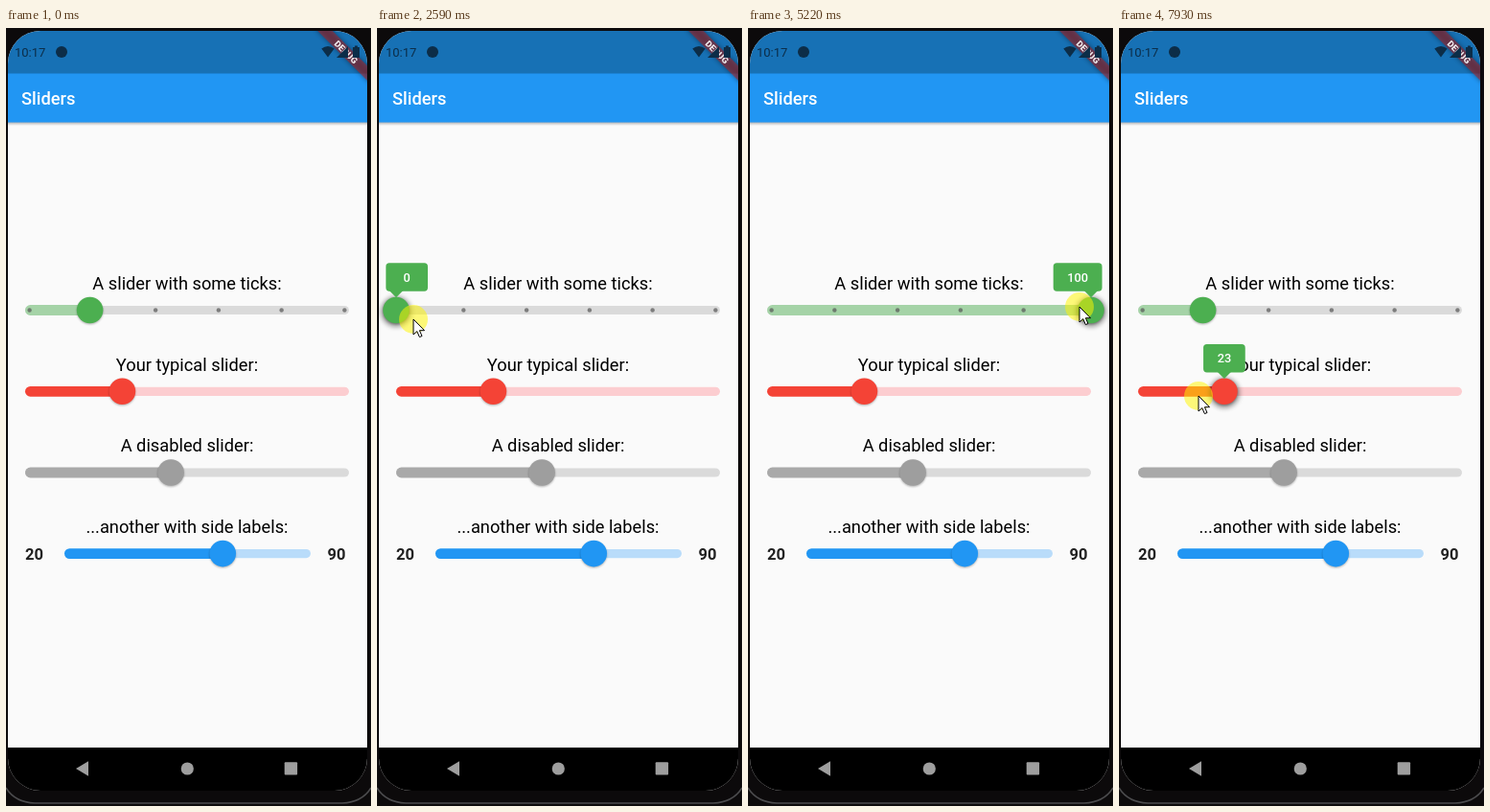
An HTML page for the animation above (8000 ms loop, 381 by 812 pixels).

```html
<!DOCTYPE html>
<html lang="en">
<head>
<meta charset="utf-8">
<title>Sliders</title>
<style>
  html, body { margin: 0; width: 100%; height: 100%; overflow: hidden; background: #0c0a0b; }
  svg { display: block; width: 381px; height: 812px; font-family: Roboto, sans-serif; }
  .caption { font-size: 18.28px; text-anchor: middle; fill: #000; }
  .side { font-size: 16.5px; font-weight: 700; text-anchor: middle; fill: #212121; }
  .tip { font-size: 12.8px; font-weight: 500; text-anchor: middle; fill: #fff; }
</style>
</head>
<body>
<svg viewBox="0 0 381 812">
  <defs>
    <clipPath id="screen"><rect x="2" y="3" width="375" height="793" rx="34"/></clipPath>
    <filter id="soft" x="-60%" y="-60%" width="220%" height="220%"><feGaussianBlur stdDeviation="1"/></filter>
    <filter id="wide" x="-60%" y="-60%" width="220%" height="220%"><feGaussianBlur stdDeviation="2.6"/></filter>
    <linearGradient id="shade" x2="0" y2="1">
      <stop stop-color="#000" stop-opacity=".3"/><stop offset="1" stop-color="#000" stop-opacity="0"/>
    </linearGradient>
  </defs>

  <rect width="381" height="812" fill="#0c0a0b"/>
  <path d="M0 793Q9 808 30 809H351Q372 808 381 793" fill="none" stroke="#4b4b4d" stroke-width="1.5"/>
  <g clip-path="url(#screen)">
    <rect x="2" y="3" width="375" height="793" fill="#fafafa"/>
    <rect x="2" y="98" width="375" height="4" fill="url(#shade)"/>
    <rect x="2" y="47" width="375" height="51.5" fill="#2196f3"/>
    <rect x="2" y="3" width="375" height="44.5" fill="#1771b5"/>
    <rect x="2" y="751" width="375" height="45" fill="#000"/>
    <g transform="translate(377 3) rotate(45)">
      <rect x="-40" y="25.6" width="80" height="11" fill="#000" opacity=".4" filter="url(#wide)"/>
      <rect x="-40" y="25.6" width="80" height="11" fill="#b71c1c" fill-opacity=".5"/>
      <text y="34.5" font-size="9.3" font-weight="900" text-anchor="middle" fill="#fff" fill-opacity=".9">DEBUG</text>
    </g>
  </g>

  <g fill="#0c2d48">
    <text x="9" y="30" font-size="13">10:17</text>
    <circle cx="58" cy="25" r="6"/>
    <path d="M329.3 21.5Q336 16.5 342.7 21.5L336 30.5ZM345 31L357 19V31Z"/>
    <path d="M362 20H364V18.5H367V20H369V31H362Z"/>
  </g>
  <text x="16" y="80" font-size="18.28" font-weight="500" fill="#fff">Sliders</text>

  <g fill="#9e9e9e">
    <path d="M73 773L86 765.3V780.7Z"/>
    <circle cx="189.3" cy="773" r="6.6"/>
    <rect x="290.7" y="766.2" width="13.4" height="13.4" rx="1"/>
  </g>

  <text class="caption" x="189" y="273">A slider with some ticks:</text>
  <text class="caption" x="189" y="357.5">Your typical slider:</text>
  <text class="caption" x="189" y="442.3">A disabled slider:</text>
  <text class="caption" x="189" y="527">...another with side labels:</text>
  <text class="side" x="29.5" y="554.7">20</text>
  <text class="side" x="345" y="554.7">90</text>

  <g id="sliders"></g>
  <g id="cursor">
    <circle id="press" r="15" fill="#fff500" fill-opacity=".52"/>
    <path d="M0 0V16L3.8 12.6L6.4 18.6L9 17.5L6.4 11.7H11.5Z" fill="#fff" stroke="#000" stroke-width="1" stroke-linejoin="round"/>
  </g>
</svg>

<script>
const LOOP = 8000, SNAP = 75;
const byId = id => document.getElementById(id);
const clamp = (v, lo, hi) => Math.min(hi, Math.max(lo, v));

function add(parent, tag, attrs) {
  const el = document.createElementNS('http://www.w3.org/2000/svg', tag);
  set(el, attrs);
  parent.append(el);
  return el;
}
function set(el, attrs) {
  for (const k in attrs) el.setAttribute(k, attrs[k]);
}

function makeSlider({ x = 20, y, w = 338, on, off, thumb, ticks }) {
  const g = add(byId('sliders'), 'g', {});
  add(g, 'rect', { x, y: y - 4.6, width: w, height: 9.2, rx: 4.6, fill: off });
  const bar = add(g, 'rect', { x, y: y - 5.4, height: 10.8, rx: 5.4, fill: on });
  if (ticks) for (let i = 0; i < 6; i++)
    add(g, 'circle', { cx: x + 4.6 + i * (w - 9.2) / 5, cy: y, r: 2.2, fill: '#555', 'fill-opacity': .7 });
  const halo = add(g, 'circle', { cy: y + 1.5, r: 16, opacity: 0, filter: 'url(#wide)' });
  const shadow = add(g, 'circle', { cy: y + 1, r: 13.7, opacity: .3, filter: 'url(#soft)' });
  const knob = add(g, 'circle', { cy: y, r: 13.8, fill: thumb });
  const tip = add(g, 'g', { fill: '#4caf50' });
  const box = add(tip, 'rect', { y: -36, height: 29.5, rx: 3.7 });
  add(tip, 'path', { d: 'M-7.5 -7.5H7.5L0 0Z' });
  const text = add(tip, 'text', { class: 'tip', y: -16.7 });

  return (value, shown = 0, label = value) => {
    const cx = x + w * value / 100;
    set(bar, { width: cx - x });
    for (const c of [halo, shadow, knob]) set(c, { cx });
    set(halo, { opacity: .38 * shown });
    set(tip, { transform: `translate(${cx} ${y - 13.3}) scale(${shown})`, opacity: shown });
    const str = String(Math.round(label));
    const width = 29.3 + 7.2 * Math.max(2, str.length);
    const left = clamp(cx - width / 2, 9.3, 369.6 - width) - cx;
    set(box, { x: left, width });
    set(text, { x: left + width / 2 });
    if (text.textContent !== str) text.textContent = str;
  };
}

const green = makeSlider({ y: 294.5, on: '#a5d3a7', off: '#dadada', thumb: '#4caf50', ticks: true });
const red = makeSlider({ y: 379.3, on: '#f44336', off: '#fccdd0', thumb: '#f44336' });
makeSlider({ y: 464, on: '#a9a9a9', off: '#dadada', thumb: '#9e9e9e' })(45);
makeSlider({ x: 61, y: 548.6, w: 257, on: '#2196f3', off: '#b9dcfa', thumb: '#2196f3' })(64.3);

// time, x, y
const path = [
  [500, 384, 60], [700, 315, 64], [900, 228, 95], [1100, 175, 220], [1290, 140, 329], [1500, 84, 299],
  [1960, 84, 299], [2100, 80, 299], [2590, 38, 304], [2860, 38, 304], [3070, 95, 297],
  [3400, 95, 297], [3560, 125, 293], [3840, 160, 293], [4000, 160, 293], [4590, 247, 292],
  [4800, 277, 292], [4830, 277, 292], [5220, 346, 291], [5380, 346, 291], [6190, 127, 311],
  [6470, 109, 313], [6730, 109, 313], [7130, 141, 392], [7400, 125, 385], [7510, 118, 384], [7930, 83, 384]
];
// time, tick value
const stops = [[0, 20], [2420, 0], [2960, 20], [3610, 40], [4250, 60], [4690, 80], [5080, 100],
  [5520, 80], [5750, 60], [5990, 40], [6310, 20]];
const redThumb = [[7430, 30], [7510, 28.8], [7930, 26.6]];
const redLabel = [[7430, 30], [7930, 23]];

function track(rows, t, col = 1) {
  const i = rows.findIndex(r => r[0] > t);
  if (i === 0) return rows[0][col];
  if (i < 0) return rows[rows.length - 1][col];
  const a = rows[i - 1], b = rows[i];
  return a[col] + (b[col] - a[col]) * (t - a[0]) / (b[0] - a[0]);
}
function snapped(t) {
  const i = stops.findLastIndex(s => s[0] <= t);
  const [at, value] = stops[i], from = i ? stops[i - 1][1] : value;
  const k = 1 - (1 - clamp((t - at) / SNAP, 0, 1)) ** 2;
  return [from + (value - from) * k, value];
}
const ramp = (t, start, end) => clamp((t - start) / 100, 0, 1) * clamp((end - t) / 100, 0, 1);

function draw(t) {
  const [value, label] = snapped(t);
  green(value, ramp(t, 1990, 6900), label);
  red(track(redThumb, t), ramp(t, 7410, 9000), track(redLabel, t));
  const pressed = (t >= 1955 && t < 6725) || t >= 7370;
  set(byId('press'), { visibility: pressed ? 'visible' : 'hidden' });
  set(byId('cursor'), {
    transform: `translate(${track(path, t, 1)} ${track(path, t, 2)})`,
    display: t < 530 ? 'none' : 'inline'
  });
}

const start = performance.now();
function frame() {
  draw((performance.now() - start) % LOOP);
  requestAnimationFrame(frame);
}
frame();
</script>
</body>
</html>
```
